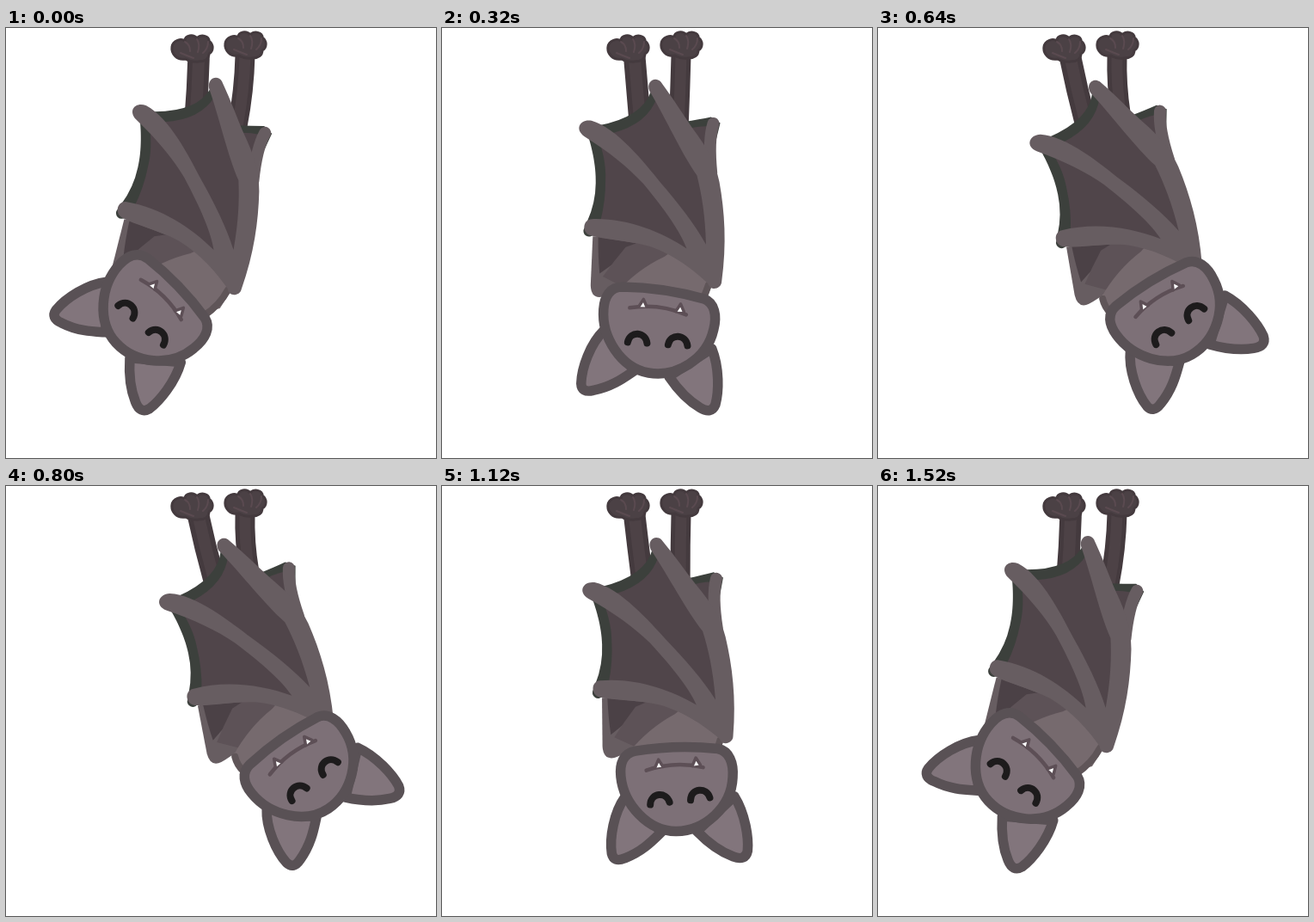
Recreate the animation shown at these times as an HTML page. Size 500x500 px, loop 1600 ms.

```html
<!DOCTYPE html>
<html lang="en">
<head>
<meta charset="utf-8">
<title>Swinging bat</title>
<style>
  html, body { margin: 0; width: 100%; height: 100%; overflow: hidden; background: #fff; }
  svg { display: block; width: 100vw; height: 100vh; }
  .line { fill: none; stroke-linecap: round; stroke-linejoin: round; }
  .limb { stroke: #443a3e; }
  .bone { stroke: #4d4246; }
  .skin { fill: #675d61; }
  .web { fill: #50454a; }
  .rim { fill: #3c403c; }
  .face { fill: #7d7077; stroke: #595155; stroke-width: 11.5; stroke-linejoin: round; }
  .ear { fill: #82757c; }
</style>
</head>
<body>
<svg viewBox="0 0 500 500">
  <g id="legs">
    <path id="legL" class="line limb" stroke-width="25.500"/>
    <path id="boneL" class="line bone" stroke-width="14"/>
    <path id="legR" class="line limb" stroke-width="23"/>
    <path id="boneR" class="line bone" stroke-width="13"/>
    <g id="foot">
      <path fill="#4b4145" stroke="#443a3e" stroke-width="3" stroke-linejoin="round"
        d="M209 36C198 38 192 29 193 22C194 14 204 12 208 15C208 8 218 7 222 12C227 7 236 9 236 15C242 20 241 27 236 30C236 36 231 39 224 39Q215 40 209 36Z"/>
      <path class="line" stroke="#5a4a50" stroke-width="2"
        d="M208 16Q214 19 214 27M222 13Q226 19 223 28M235 16Q235 24 229 29M203 29Q210 32 218 35"/>
    </g>
    <use href="#foot" transform="translate(62 -4)"/>
  </g>

  <g id="body">
    <!-- far wing -->
    <path class="rim" d="M268 113Q286 114 300 114L309 123L300 142L280 160Z"/>
    <path class="web" d="M266 122Q282 121 295 124L288 165H268Z"/>
    <path class="line" stroke="#675d61" stroke-width="14" d="M301 122Q291 140 287 178"/>
    <path class="skin" d="M137 222L123 277Q120 293 134 293Q146 292 163 288L216 262L180 232Z"/>
    <path fill="#4b4146" d="M143 224Q138 247 136 266L190 242Z"/>

    <!-- torso -->
    <path fill="#5d5257" d="M139 270Q154 256 172 242L200 238L240 255L220 270L161 288Z"/>
    <path fill="#766a6e" d="M150 292Q180 270 214 262L240 250L268 295L248 326L200 338L150 311Z"/>
    <path class="line" stroke="#5f5558" stroke-width="8" d="M257 305Q248 322 230 334M151 294Q149 304 153 314"/>

    <!-- near wing -->
    <circle class="rim" cx="134" cy="215" r="6.5"/>
    <path class="rim" d="M238 70Q222 98 170 97L155 102C157 116 158 142 153 162Q148 185 134 204L241 262L268 260L275 150Z"/>
    <path class="web" d="M243 79Q226 107 184 109L166 112C169 125 169 145 165 160Q160 185 149 207L241 262L268 260L275 150Z"/>
    <path class="skin" d="M236 70C234 58 246 54 251 62C262 86 268 103 276 122C288 148 294 165 294 190C293 225 288 262 273 304C271 312 258 313 257 303C245 285 225 262 200 247C175 234 150 229 134 220C125 214 130 200 140 202C180 209 215 232 241 258C238 238 226 210 207 174C194 152 176 130 151 106C141 95 151 85 163 90C190 104 213 150 227 177C241 202 256 232 264 258C270 225 271 200 270 177C258 150 248 105 236 70Z"/>
  </g>

  <!-- drawn upright around the neck -->
  <g id="head">
    <path class="face ear" d="M-57 61C-71 79 -77 108 -75 126Q-73 137 -60 132C-39 125 -26 112 -16 103Z"/>
    <path class="face ear" d="M70 65C82 86 85 114 83 129Q80 141 66 135C49 128 34 114 25 104Z"/>
    <path class="face" d="M-43 8Q5 2 53 9C66 12 71 26 69 43C66 78 34 104 1 103C-32 102 -59 69 -61 37C-62 22 -57 10 -43 8Z"/>
    <g class="line" stroke="#5d4f56" stroke-width="4.5">
      <path d="M-31 31Q2 21 35 30"/>
      <path id="fang" fill="#fff" stroke-width="3.500" d="M-21 28.500L-16.500 19L-11.500 27.500"/>
      <use href="#fang" x="43.500" y="-.5"/>
    </g>
    <g class="line" stroke="#1d1b1c" stroke-width="8">
      <path id="eye" d="M-28 71C-27 57 -9 56 -5.500 69"/>
      <use href="#eye" x="47" y="-3.500"/>
    </g>
  </g>
</svg>
<script>
const LOOP = 1600, STEP = 80;
const hip = { x: 255, y: 46 };
const spine = { x: 255, y: 37 }, neck = { x: 200, y: 293 };
const $ = id => document.getElementById(id);
const set = (id, name, value) => $(id).setAttribute(name, value);

function leg(side, x, y, midX, endX, endY) {
  const d = `M${x} ${y}Q${midX} ${(y + endY) / 2} ${endX} ${endY}`;
  set('leg' + side, 'd', d);
  set('bone' + side, 'd', d);
}

function draw(ms) {
  const t = Math.floor(ms % LOOP / STEP) * STEP;
  const a = (t + 35) / LOOP * 2 * Math.PI;
  // the way out is a little quicker than the way back
  const tilt = 5 + 41 * Math.cos(a) - 4.5 * Math.max(0, Math.sin(a)) ** 2;
  const swing = 0.308 * (tilt - 46);

  // the neck orbits the top of the spine
  const r = swing * Math.PI / 180, c = Math.cos(r), s = Math.sin(r);
  const dx = neck.x - spine.x, dy = neck.y - spine.y;
  const nx = spine.x + dx * c - dy * s, ny = spine.y + dx * s + dy * c;

  set('body', 'transform', `rotate(${swing} ${hip.x} ${hip.y})`);
  set('head', 'transform', `translate(${nx} ${ny}) rotate(${tilt})`);

  const k = -swing / 23.7;
  leg('L', 224, 36, 223 + 8 * k, 220 + 20 * k, 106);
  leg('R', 278, 32, 277, 269 + 13 * k, 114 - 14 * k);
}

const start = performance.now();
function tick() {
  draw(performance.now() - start);
  requestAnimationFrame(tick);
}
tick();
</script>
</body>
</html>
```
